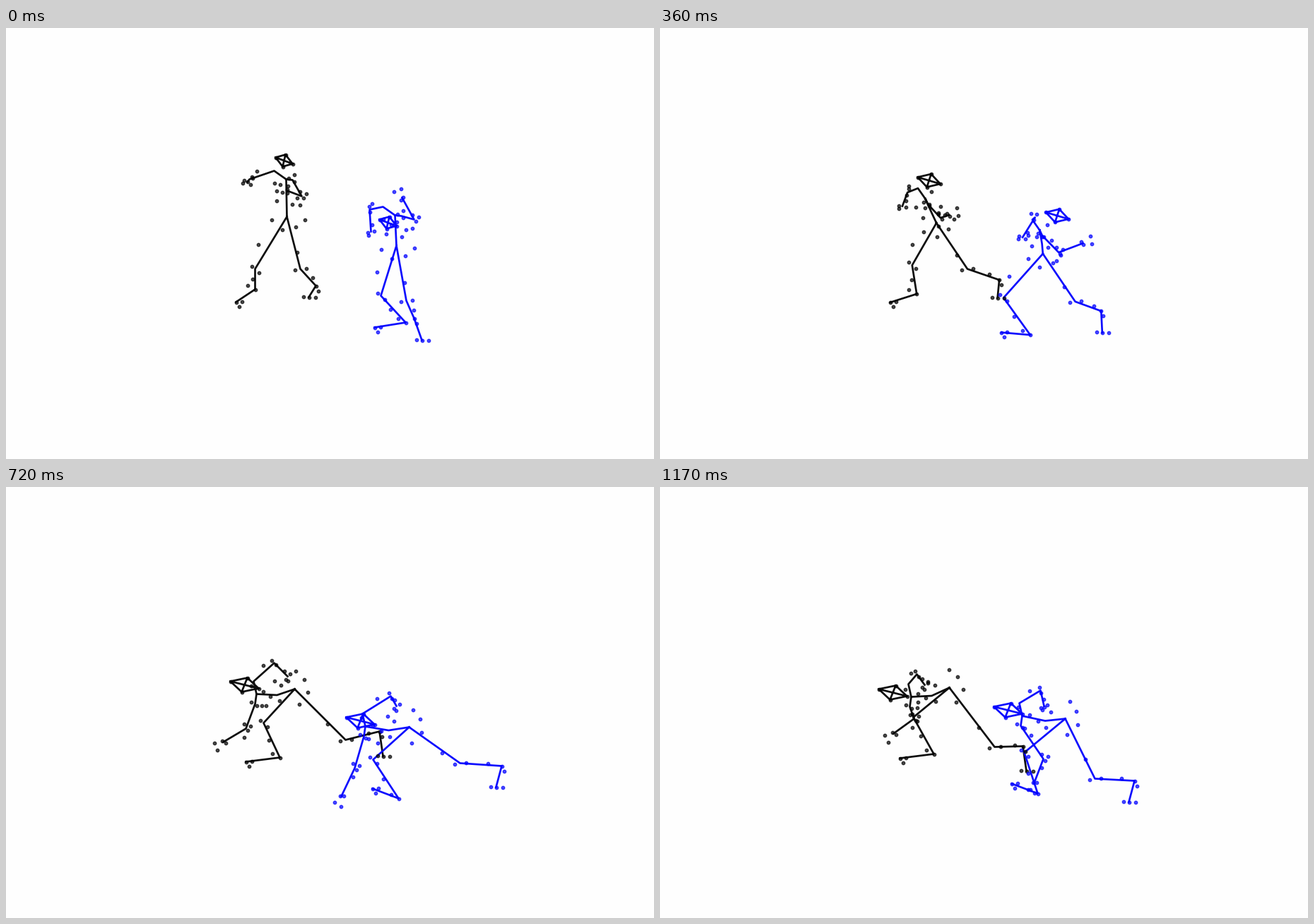
These frames come from a looping animation (917x611 px, 1.2 s). A matplotlib script:

```python
import numpy as np
import matplotlib.pyplot as plt
from matplotlib.animation import FuncAnimation

W, H, DPI = 917, 611, 64
PT = 72 / DPI  # points per pixel
FRAMES, INTERVAL = 40, 30
KEYS = np.array([0, 8, 16, 24, 32, 39])

# 0 while standing, 1 once down in the lunge
ease = np.clip(np.arange(FRAMES) / 24, 0, 1)[:, None]
CROUCH = ease * ease * (3 - 2 * ease)

CHAINS = [
    ["neck", "shoulder_a", "elbow_a", "hand_a"],
    ["neck", "shoulder_b", "elbow_b", "hand_b"],
    ["neck", "spine", "hip"],
    ["hip", "knee_a", "ankle_a", "toe_a"],
    ["hip", "knee_b", "ankle_b", "toe_b"],
    ["brow", "crown", "nape", "chin", "brow", "nape"],
    ["crown", "chin"],
]
JOINT_DOTS = ["brow", "crown", "nape", "chin", "ankle_a", "toe_a", "ankle_b", "toe_b"]

# Markers with a fixed screen offset from a point at share t of a bone
PINNED = [
    ("shoulder_a", "elbow_a", 0.6, [(-4, -7)]),
    ("neck", "shoulder_b", 1, [(-6, -3), (2, 2)]),
    ("shoulder_b", "elbow_b", 1, [(-3, -7), (6, -4), (2, 2), (-3, 12)]),
    ("hip", "knee_a", 0.6, [(-14, -5)]),
    ("hip", "knee_a", 1, [(-5, -4), (5, 5)]),
    ("knee_a", "ankle_a", 0.5, [(-4, 0)]),
    ("knee_a", "ankle_a", 1, [(-11, -6)]),
    ("ankle_a", "toe_a", 1, [(8, -1), (4, 6)]),
    ("hip", "knee_b", 0.6, [(3, 6)]),
    ("hip", "knee_b", 1, [(-8, 1), (8, -1)]),
    ("knee_b", "ankle_b", 0.6, [(4, -2)]),
    ("knee_b", "ankle_b", 1, [(3, 7)]),
    ("ankle_b", "toe_b", 1, [(-8, -1), (9, 0)]),
]
# Markers that turn with a bone: (along, aside) from the same kind of point
TURNING = [
    ("hip", "neck", 0, [(-5, 25), (-15, 12), (-18, -7), (-4, -22)]),
    ("hip", "neck", 0.5, [(8, -6), (-9, 8), (-4, -14), (0, 15)]),
    ("hip", "neck", 1, [(6, 12), (-5, -17), (-10, 2)]),
    ("elbow_a", "hand_a", 0, [(-5, 0), (4, 0)]),
    ("elbow_a", "hand_a", 1, [(-9, -2), (0, -5), (5, 4), (1, 5)]),
    ("elbow_b", "hand_b", 1, [(-2, -3), (0, 2), (13, -6), (12, 5)]),
]


def blend(a, b, t):
    return a + (b - a) * t


def shift(start, end):
    """An offset that eases from standing to lunging."""
    return blend(np.array(start), np.array(end), CROUCH)


def smooth(points):
    """Cubic Hermite path through key points, sampled on every frame."""
    slopes = np.gradient(points, KEYS, axis=0)
    f = np.arange(FRAMES)
    i = np.clip(np.searchsorted(KEYS, f, side="right") - 1, 0, len(KEYS) - 2)
    span = (KEYS[i + 1] - KEYS[i])[:, None]
    t = (f - KEYS[i])[:, None] / span
    return ((2 * t**3 - 3 * t**2 + 1) * points[i]
            + (t**3 - 2 * t**2 + t) * span * slopes[i]
            + (3 * t**2 - 2 * t**3) * points[i + 1]
            + (t**3 - t**2) * span * slopes[i + 1])


class Body:
    def __init__(self, color):
        self.color = color
        self.joints = {}

    def joint(self, name, *xy):
        self.joints[name] = smooth(np.reshape(xy, (-1, 2)).astype(float))

    def finish(self, toe_a, toe_b):
        """Derive the remaining joints and all markers from the keyed joints."""
        j = self.joints
        j["crown"] = j["brow"] + shift((14, -4), (24, -5))
        j["nape"] = j["brow"] + shift((24, 9), (40, 10))
        j["chin"] = j["brow"] + j["nape"] - j["crown"]
        j["spine"] = blend(j["hip"], j["neck"], 0.5) + shift((0, 0), (2, 5))
        j["shoulder_a"] = j["neck"] + shift((-17, -12), (-4, -18))
        j["shoulder_b"] = j["neck"] + shift((9, 1), (-2, 14))
        j["toe_a"] = j["ankle_a"] + shift(*toe_a)
        j["toe_b"] = j["ankle_b"] + shift(*toe_b)

        dots = [j[name] for name in JOINT_DOTS]
        for a, b, t, offsets in PINNED:
            dots += [blend(j[a], j[b], t) + o for o in offsets]
        for a, b, t, offsets in TURNING:
            along = j[b] - j[a]
            along = along / np.hypot(*along.T)[:, None]
            aside = np.column_stack([-along[:, 1], along[:, 0]])
            dots += [blend(j[a], j[b], t) + p * along + q * aside for p, q in offsets]
        self.spots = np.stack(dots, axis=1)

    def add_to(self, ax):
        self.line, = ax.plot([], [], color=self.color, lw=2.7 * PT, alpha=0.95,
                             solid_joinstyle="round")
        self.dots = ax.scatter([], [], s=(4.4 * PT) ** 2, color=self.color,
                               alpha=0.7, linewidths=1.4 * PT, zorder=3)

    def pose(self, f):
        path = []
        for chain in CHAINS:
            path += [self.joints[n][f] for n in chain] + [(np.nan, np.nan)]
        self.line.set_data(*np.transpose(path))
        self.dots.set_offsets(self.spots[f])
        return self.line, self.dots


dark = Body("black")
dark.joint("brow", 381, 183, 378, 195, 347, 231, 317, 275, 311, 282, 309, 286)
dark.joint("neck", 396, 214, 385, 227, 365, 259, 354, 293, 353, 299, 355, 297)
dark.joint("hip", 397, 267, 388, 272, 396, 280, 408, 286, 407, 296, 409, 284)
dark.joint("elbow_a", 344, 214, 348, 227, 354, 238, 379, 249, 383, 246, 363, 265)
dark.joint("hand_a", 341, 218, 344, 244, 347, 258, 398, 268, 404, 263, 374, 280)
dark.joint("elbow_b", 418, 238, 409, 242, 380, 300, 339, 342, 340, 341, 359, 328)
dark.joint("hand_b", 397, 230, 419, 211, 386, 325, 307, 361, 309, 355, 330, 349)
dark.joint("knee_a", 352, 341, 357, 337, 356, 335, 364, 334, 360, 333, 358, 326)
dark.joint("ankle_a", 352, 370, 361, 378, 366, 375, 387, 383, 389, 386, 387, 378)
dark.joint("knee_b", 416, 341, 416, 348, 456, 336, 480, 358, 475, 369, 473, 368)
dark.joint("ankle_b", 438, 365, 455, 368, 505, 345, 528, 346, 523, 350, 513, 367)
dark.finish(toe_a=[(-27, 18), (-48, 6)], toe_b=[(-10, 16), (5, 35)])

blue = Body("blue")
blue.joint("brow", 528, 271, 550, 253, 532, 277, 481, 326, 464, 346, 472, 311)
blue.joint("neck", 550, 265, 544, 275, 528, 301, 508, 339, 507, 353, 512, 324)
blue.joint("hip", 552, 308, 542, 313, 545, 327, 570, 340, 576, 349, 573, 328)
blue.joint("elbow_a", 514, 257, 538, 262, 522, 276, 544, 296, 549, 309, 538, 288)
blue.joint("hand_a", 516, 288, 518, 288, 512, 305, 552, 310, 568, 318, 543, 310)
blue.joint("elbow_b", 577, 271, 568, 293, 553, 346, 493, 398, 497, 382, 542, 385)
blue.joint("hand_b", 560, 240, 597, 263, 581, 354, 474, 438, 456, 381, 529, 419)
blue.joint("knee_a", 530, 379, 495, 380, 485, 384, 519, 386, 525, 389, 515, 376)
blue.joint("ankle_a", 565, 417, 535, 427, 520, 441, 555, 441, 556, 445, 534, 434)
blue.joint("knee_b", 566, 386, 571, 384, 607, 391, 642, 391, 643, 404, 615, 413)
blue.joint("ankle_b", 577, 411, 597, 405, 654, 397, 701, 395, 710, 399, 671, 416)
blue.finish(toe_a=[(-44, 7), (-37, -14)], toe_b=[(11, 31), (-8, 30)])

fig = plt.figure(figsize=(W / DPI, H / DPI), dpi=DPI, facecolor="#fefefe")
ax = fig.add_axes([0, 0, 1, 1])
ax.axis("off")
for body in (dark, blue):
    body.add_to(ax)
ax.set(xlim=(-0.5, W - 0.5), ylim=(H - 0.5, -0.5))


def draw(f):
    return dark.pose(f) + blue.pose(f)


anim = FuncAnimation(fig, draw, frames=FRAMES, interval=INTERVAL, repeat=True)
plt.show()
```
